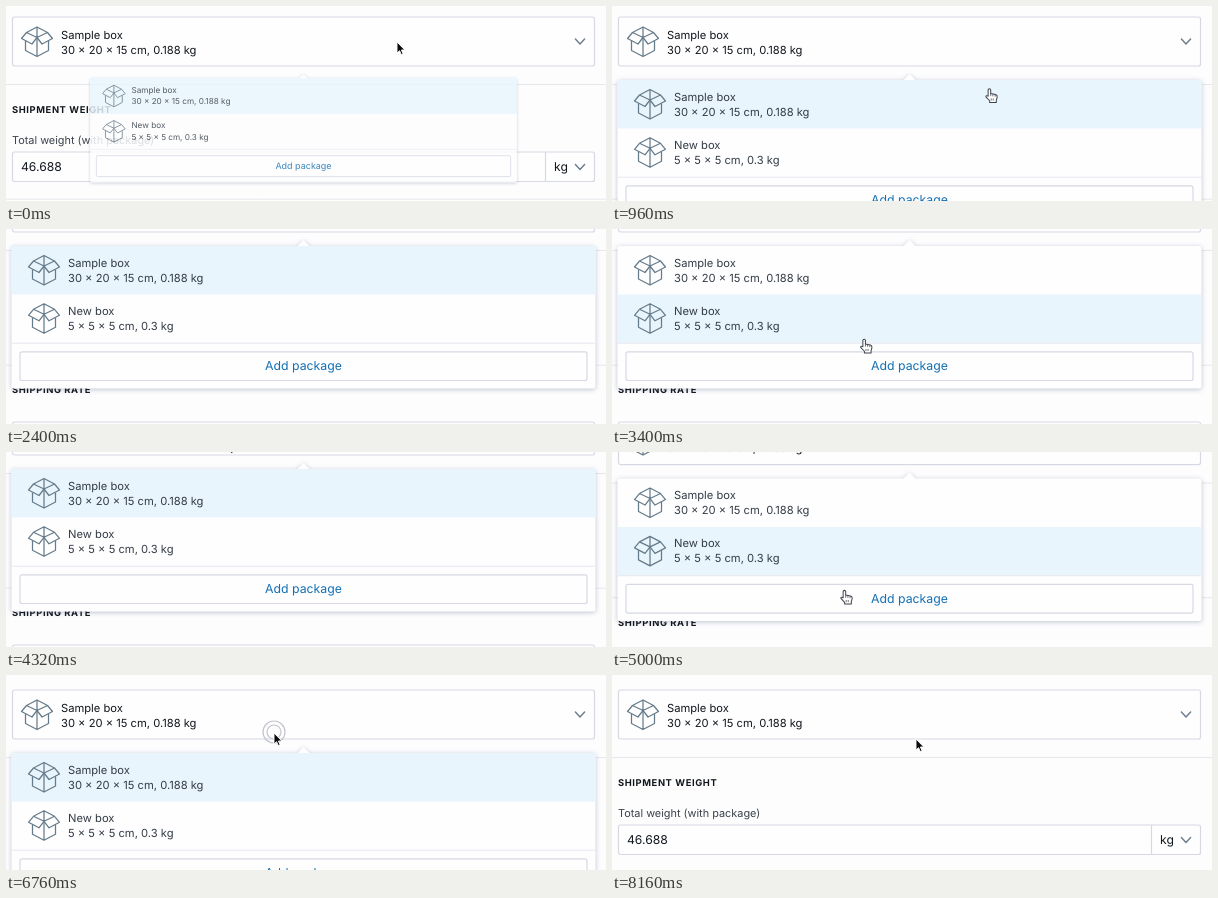
An HTML page for the animation above (8.64 s loop, 600x195 px).

```html
<!DOCTYPE html>
<html lang="en">
<head>
<meta charset="utf-8">
<title>Package picker</title>
<style>
  html, body { margin: 0; width: 100%; height: 100%; overflow: hidden; background: #fdfdfe; }
  svg { display: block; width: 100%; height: 100%; }
  text { font-family: Inter, Roboto, "Liberation Sans", sans-serif; font-size: 11.2px; fill: #12171d; text-rendering: geometricPrecision; }
  .item text { fill: #343c46; }
  .head { font-size: 9.4px; font-weight: 700; letter-spacing: .6px; }
  .label { font-size: 10.9px; fill: #3c434c; }
  .big { font-size: 12.2px; }
  .add { font-size: 12.3px; fill: #1470b4; text-anchor: middle; }
  .field { fill: #fefeff; stroke: #d6d9e4; stroke-width: 1.2; }
  .rule { stroke: #e7e8ee; fill: none; }
  .chevron { fill: none; stroke: #6d7f8e; stroke-width: 1.5; stroke-linecap: round; stroke-linejoin: round; }
  .icon { fill: none; stroke: #667b89; stroke-width: 1.25; stroke-linejoin: round; }
  .panel { filter: drop-shadow(0 1px 2.5px rgba(45, 60, 95, .3)); }
  .ring { fill: none; stroke: #c2c5cd; stroke-width: 1.2; }
</style>
</head>
<body>
<svg viewBox="0 0 600 195" xmlns="http://www.w3.org/2000/svg">
  <defs>
    <g id="box" class="icon">
      <path d="M-10.5-9 0-14.5 10.5-9 0-4ZM0-14.5V-4"/>
      <path d="M-10.5-9-15.5-3-5 2.5 0-4 5 2.5 15.5-3 10.5-9"/>
      <path d="M-11.5-.5V9L0 15 11.5 9V-.5M0-4V15"/>
    </g>
    <path id="chev" class="chevron" d="M-4.6-2.4 0 2.4 4.6-2.4"/>
  </defs>

  <g id="page">
    <rect class="field" x="6.5" y="15" width="582" height="49" rx="2"/>
    <use href="#box" x="31" y="39.5"/>
    <text x="55" y="36.6">Sample box</text>
    <text x="55" y="51.8">30 × 20 × 15 cm, 0.188 kg</text>
    <use href="#chev" x="574" y="39.5"/>

    <path class="rule" d="M0 82.5H600M0 197.2H600"/>
    <text class="head" x="6" y="111">SHIPMENT WEIGHT</text>
    <text class="label" x="6" y="142.3">Total weight (with package)</text>
    <rect class="field" x="6.5" y="150" width="582" height="29.5" rx="2"/>
    <path d="M539.5 150V179.5" stroke="#d6d9e4" stroke-width="1.2"/>
    <text class="big" x="15" y="169.3">46.688</text>
    <text class="big" x="548" y="169.3">kg</text>
    <use href="#chev" x="574" y="165"/>

    <text class="head" x="6" y="225.2">SHIPPING RATE</text>
    <rect class="field" x="6.5" y="254" width="582" height="30" rx="2"/>

    <g id="menu">
      <path class="panel" fill="#fefeff" d="M8 78H291.5L297.5 72 303.5 78H587.5Q589.5 78 589.5 80V218.5Q589.5 220.5 587.5 220.5H7.5Q5.5 220.5 5.5 218.5V80Q5.5 78 8 78Z"/>
      <rect id="hover" x="5.5" y="78" width="584" height="48.5" fill="#e9f5fd"/>
      <g class="item">
        <use href="#box" x="38" y="102"/>
        <text x="62" y="98.6">Sample box</text>
        <text x="62" y="113.8">30 × 20 × 15 cm, 0.188 kg</text>
        <use href="#box" x="38" y="150.3"/>
        <text x="62" y="146.7">New box</text>
        <text x="62" y="161.9">5 × 5 × 5 cm, 0.3 kg</text>
      </g>
      <path class="rule" d="M6 175.2H589"/>
      <rect class="field" x="14" y="183.9" width="567" height="28.6" rx="2"/>
      <text class="add" x="297.5" y="202.4">Add package</text>
    </g>

    <g id="rings">
      <circle id="outer" class="ring"/>
      <circle id="inner" class="ring"/>
    </g>
    <g id="cursor" stroke-linejoin="round">
      <path id="arrow" fill="#0b0b0d" stroke="#fff" stroke-width=".9" d="M0 0V11L2.6 8.7 4.3 12.6 6.1 11.8 4.4 8H7.8Z"/>
      <g id="hand" transform="translate(.4 .8) scale(.92)" stroke="#3d434a">
        <path fill="#fff" stroke-width="1.1" d="M-1.4 8V1Q0-.9 1.4 1V5L6.6 6.2Q8.7 6.8 8.5 9L7.5 12.3V14.8H.3V13L-3.8 8.8Q-3.9 6.6-1.4 8Z"/>
        <path fill="none" stroke-width=".8" d="M1.4 5V8M3.8 6V8.2M6.2 6.6V8.6M2 10.5V12.8M4.2 10.5V12.8"/>
      </g>
    </g>
  </g>
</svg>
<script>
const LOOP = 8640, STEP = 40;
const $ = id => document.getElementById(id);
const clamp = u => Math.min(1, Math.max(0, u));
const linear = u => u;
const smooth = u => u * u * (3 - 2 * u);
const out = power => u => 1 - (1 - u) ** power;

// Each key: time, values, easing used on the way to it.
const scrollKeys = [
  [1720, [4]], [2080, [59.5], out(1.5)],
  [2200, [59.5]], [2400, [61], smooth],
  [4920, [61]], [5240, [0], smooth]
];
const cursorKeys = [
  [800, [391, 40]], [960, [377, 86], smooth],
  [1480, [377, 86]], [1520, [268, 185]], [1560, [264, 275]],
  [3240, [264, 275]], [3280, [262, 214]], [3760, [221, 40]],
  [4280, [221, 40]], [4320, [221, 50]], [4680, [232, 189], smooth],
  [5440, [232, 189]], [5480, [234, 150]], [5520, [236, 103]],
  [5760, [268, 58], out(2)],
  [7960, [268, 58]], [8160, [304, 64], smooth]
];
const opens = [-45, 6360], closes = [6040, 6840], clicks = [5960, 6320, 6680];

function at(keys, t) {
  const next = keys.findIndex(k => k[0] > t);
  if (next === 0) return keys[0][1];
  if (next < 0) return keys[keys.length - 1][1];
  const [t0, a] = keys[next - 1], [t1, b, ease = linear] = keys[next];
  const u = ease((t - t0) / (t1 - t0));
  return a.map((v, i) => v + (b[i] - v) * u);
}

function menuState(t) {
  const opened = Math.max(...opens.filter(s => s <= t));
  const closed = Math.max(...closes.filter(s => s <= t));
  return opened > closed
    ? out(3)(clamp((t - opened) / 165))
    : 1 - smooth(clamp((t - closed + STEP) / 200));
}

function show(el, on) {
  el.setAttribute("visibility", on ? "visible" : "hidden");
}

function draw(t) {
  const [scroll] = at(scrollKeys, t);
  const [x, y] = at(cursorKeys, t);
  $("page").setAttribute("transform", `translate(0 ${-scroll})`);

  const p = menuState(t), scale = .3 + .7 * p;
  $("menu").setAttribute("transform", `translate(297.5 71.7) scale(${scale}) translate(-297.5 -71.7)`);
  $("menu").setAttribute("opacity", Math.min(1, p * 1.35));
  show($("menu"), p > 0);

  const second = t >= 3400 && t < 5520 && y > 126.5;
  $("hover").setAttribute("y", second ? 126.5 : 78);

  const pointing = p > .5 && y > 78 && y < 220;
  $("cursor").setAttribute("transform", `translate(${x} ${y})`);
  show($("arrow"), !pointing);
  show($("hand"), pointing);

  const age = Math.min(...clicks.map(c => t >= c ? t - c : Infinity));
  const grow = clamp((age + STEP) / 120);
  show($("rings"), age < 240);
  $("rings").setAttribute("transform", `translate(${x} ${y - 1})`);
  $("rings").setAttribute("opacity", 1 - clamp((age - 80) / 160));
  $("outer").setAttribute("r", 11 * grow);
  $("inner").setAttribute("r", 7 * grow);
}

const start = performance.now();
function tick() {
  const t = (performance.now() - start) % LOOP;
  draw(Math.floor(t / STEP) * STEP);
  requestAnimationFrame(tick);
}
tick();
</script>
</body>
</html>
```
